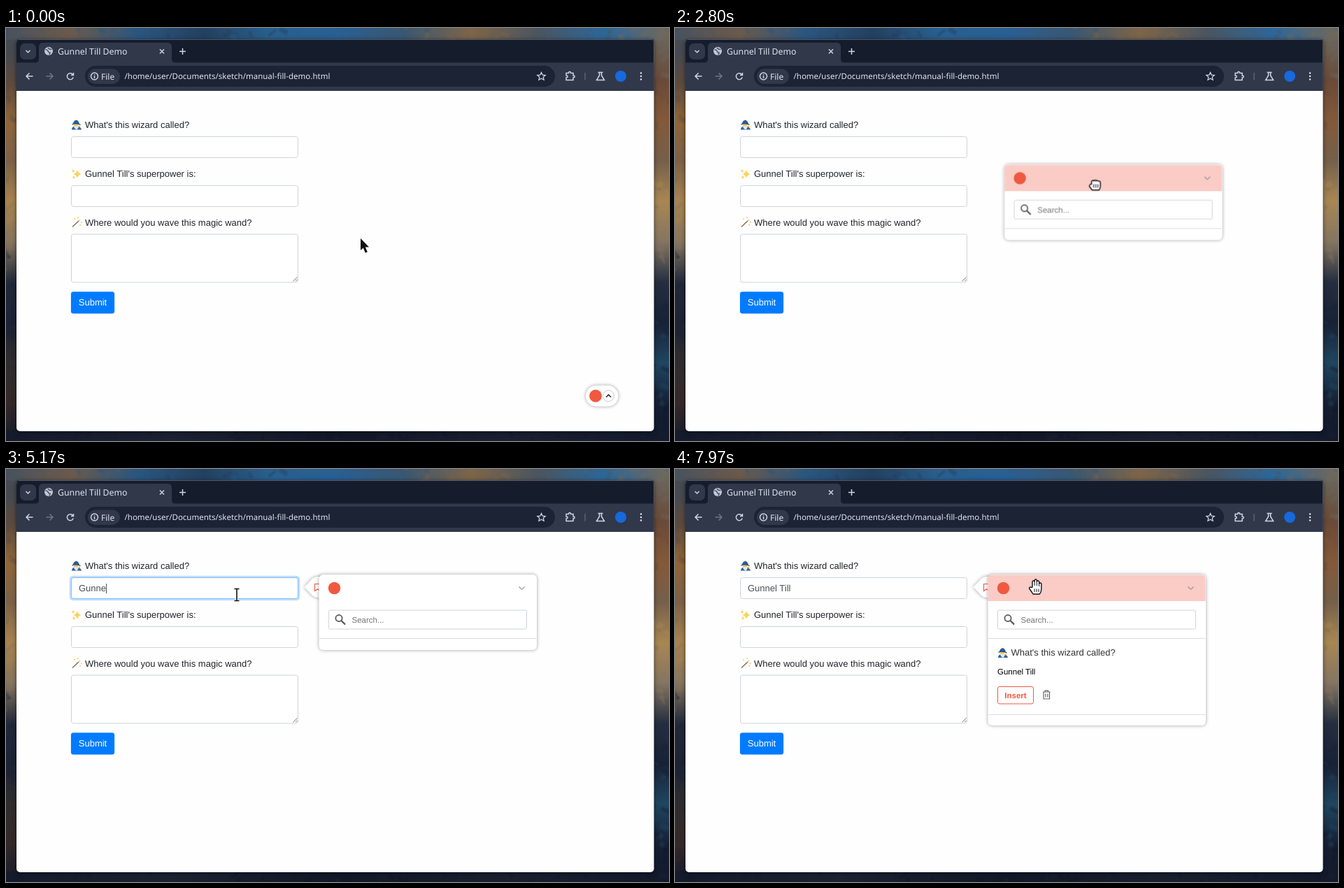
These frames come from a looping animation (948 by 591 pixels, 8 s). An HTML page:

```html
<!DOCTYPE html>
<html lang="en">
<head>
<meta charset="utf-8">
<title>Form demo</title>
<style>
html, body { margin: 0; width: 100%; height: 100%; overflow: hidden; background: #10182a; }
svg { display: block; }
text { font: 13px "Liberation Sans", Arial, sans-serif; fill: #212529; white-space: pre; text-rendering: geometricPrecision; }
.ui { font-family: "Noto Sans", sans-serif; fill: #dfe4ee; }
.small { font-size: 11.5px; }
.icon { fill: none; stroke: #cdd4e2; stroke-width: 1.5; }
.field { fill: #fff; stroke: #ced4da; }
.soft { filter: drop-shadow(0 0 2.5px rgba(0, 0, 0, .38)); }
.window { filter: drop-shadow(0 1px 3px rgba(0, 0, 0, .5)); }
.rule { stroke: #dcdfe3; }
.brand { fill: #f0593f; }
#wall { filter: blur(1px); }

/* every part shares one 8 s clock */
.anim { animation: 8s linear infinite; }
.step { animation: 8s step-end infinite; }
#cursor { animation-name: move; }
#shapes { animation-name: shape; }
#panel { animation-name: drag; }
#launcher { animation-name: leave; }
#panelView { animation-name: enter; }
#hover { animation-name: hover; }
#card { animation-name: grow; }
#item { animation-name: item; }
#ring { animation-name: focus; }
#bubble { animation-name: bubble; }
#mark { animation-name: mark; }

@keyframes move {
  0%, .4% { transform: translate(507px, 301px); animation-timing-function: ease-in-out; }
  10%, 11.25% { transform: translate(875px, 535px); animation-timing-function: ease-in-out; }
  14.1%, 21.25% { transform: translate(867px, 529px); animation-timing-function: ease-in; }
  24.1% { transform: translate(668px, 331px); animation-timing-function: ease-out; }
  31.25%, 31.6% { transform: translate(632px, 280px); animation-timing-function: ease-in-out; }
  37.9%, 40.5% { transform: translate(577px, 181px); }
  41%, 41.5% { transform: translate(577px, 179px); animation-timing-function: ease-in-out; }
  49.6%, 84.1% { transform: translate(330px, 180px); animation-timing-function: ease-in-out; }
  90%, 94.6% { transform: translate(437px, 175px); animation-timing-function: ease-in-out; }
  99.6%, 100% { transform: translate(516px, 168px); }
}
@keyframes drag {
  0%, 31.6% { transform: translate(502px, 252px); animation-timing-function: ease-in-out; }
  37.9%, 40.5% { transform: translate(447px, 153px); }
  41%, 100% { transform: translate(447px, 151px); }
}
/* cells: arrow 0, pointer 1, open hand 2, closed hand 3, text beam 4 */
@keyframes shape {
  0%, 17.5%, 45.6%, 88.3% { transform: translate(0, 0); }
  9.5%, 88.9% { transform: translate(-60px, 0); }
  27%, 41.2%, 95.8% { transform: translate(-120px, 0); }
  31.6% { transform: translate(-180px, 0); }
  46.5% { transform: translate(-240px, 0); }
}
@keyframes leave { 0% { opacity: 1; } 17.5% { opacity: 0; } }
@keyframes enter { 0% { opacity: 0; } 17.5% { opacity: 1; } }
@keyframes hover { 0%, 45.6% { opacity: 0; } 27%, 95.8% { opacity: 1; } }
@keyframes grow { 0% { height: 108px; } 93.75% { height: 216px; } }
@keyframes item { 0% { opacity: 0; } 93.75% { opacity: 1; } }
@keyframes focus { 0%, 50.4% { opacity: 0; } 52.3%, 93.4% { opacity: 1; } 94.2%, 100% { opacity: 0; } }
@keyframes bubble { 0%, 52.5% { opacity: 0; } 55%, 100% { opacity: 1; } }
@keyframes mark { 0%, 95.8% { fill: #fff; } 88.9% { fill: #f0593f; } }
</style>
</head>
<body>
<svg width="948" height="591" viewBox="0 0 948 591">
  <defs>
    <clipPath id="cell"><rect x="-25" y="-25" width="50" height="50"/></clipPath>
    <symbol id="wizard" viewBox="0 0 16 16" width="16" height="16">
      <path d="M1 15q0-5 6-5t8 5z" fill="#2b62a8"/>
      <circle cx="7" cy="8" r="3.200" fill="#f3c14b"/>
      <path d="M4 9q3 1 6.500 0q.500 4.500-2.500 6q-4-1.500-4-6z" fill="#e4e7ea"/>
      <path d="M3 6.500Q3 2 8 1q3.500 2 4 6q-4-1.500-9-.5z" fill="#2a5da0"/>
      <path d="M1.500 7.500q5-3 12 .5" fill="none" stroke="#1d3f75" stroke-width="1.300"/>
      <path d="M12 11l2.500 3.500" stroke="#805a3c"/><circle cx="12" cy="10.500" r="1.200" fill="#f2b632"/>
    </symbol>
  </defs>

  <g id="wall"></g>

  <!-- browser frame -->
  <rect class="window" x="15" y="16.500" width="911.500" height="560.500" rx="5" fill="#fffeff"/>
  <path d="M15 90V21.500q0-5 5-5H921.500q5 0 5 5V90z" fill="#151d2d"/>
  <path d="M15 90V49.500H42q5 0 5-5V27q0-6 6-6H231q6 0 6 6V44.500q0 5 5 5H926.500V90z" fill="#30384a"/>
  <rect x="20" y="22" width="23" height="23" rx="7" fill="#30384a"/>
  <rect x="113" y="54" width="672" height="30" rx="15" fill="#1b2334"/>
  <rect x="117" y="58.500" width="46" height="21.500" rx="10.700" fill="#30384a"/>
  <circle cx="61" cy="33" r="6" fill="#c2c9d6"/>
  <path d="M56.500 31q3 0 3.500 2t2.500 2-1 3M60 28q1 3 5.500 2.500" fill="none" stroke="#4a5364" stroke-width="1.500"/>
  <g class="icon">
    <path d="M28.500 32l3 3 3-3M220 30.500l6 6m0-6l-6 6M248 33.500h9m-4.500-4.500v9"/>
    <path d="M38.500 69h-9.500m4.500-4.500L29 69l4.500 4.500"/>
    <path d="M57.500 69h9.500m-4.500-4.500L67 69l-4.500 4.500" stroke="#6c7688"/>
    <path d="M95.500 66.500a4.500 4.500 0 1 0 .7 4M96.500 64v3.500H93"/>
    <circle cx="126.500" cy="69" r="5"/><path d="M126.500 68v4m0-6v1"/>
    <path d="M765.500 63.500l1.700 3.700 4 .4-3 2.700.9 4-3.600-2.100-3.600 2.100.9-4-3-2.700 4-.4z" stroke-width="1.300"/>
    <path d="M801 64.500h3.500q0-2 1.500-2t1.500 2h3.500v3.500q2 0 2 1.500t-2 1.500v3.500h-10v-3.500q2 0 2-1.500t-2-1.500z"/>
    <path d="M828 64v10.500" stroke="#596375"/>
    <path d="M846.500 63.500h7M848.500 64v4l-4 6.500h11l-4-6.500v-4"/>
  </g>
  <circle cx="879" cy="69" r="8" fill="#1769dc"/>
  <path d="M908 64.500h.01M908 69h.01M908 73.500h.01" stroke="#dfe4ee" stroke-width="2.600" stroke-linecap="round"/>
  <text class="ui" x="74" y="37.500" style="font-size:12.300px">Gunnel Till Demo</text>
  <text class="ui" x="136" y="73.500" style="font-size:12px;font-weight:500">File</text>
  <text class="ui small" x="169.500" y="73">/home/user/Documents/sketch/manual-fill-demo.html</text>

  <!-- form -->
  <use href="#wizard" x="93" y="130.500"/>
  <text x="113" y="143">What's this wizard called?</text>
  <path d="M102 203q1 5 6 6-5 1-6 6-1-5-6-6 5-1 6-6zM96 202q.500 2 2.500 2.500-2 .500-2.500 2.500-.500-2-2.500-2.500 2-.500 2.500-2.500zM97 211q.500 2 2.500 2.500-2 .500-2.500 2.500-.500-2-2.500-2.500 2-.500 2.500-2.500z" fill="#f9d35c"/>
  <text x="113" y="213">Gunnel Till's superpower is:</text>
  <path d="M95 284.500l9-8.500" stroke="#8b6a55" stroke-width="1.500"/>
  <path d="M104 276l2-2" stroke="#d8d8d8" stroke-width="2"/>
  <path d="M97 273h2m-1-1v2M102 271h2m-1-1v2M107 278h2m-1-1v2M105 282h2m-1-1v2" stroke="#f7cd5c"/>
  <text x="113" y="283">Where would you wave this magic wand?</text>
  <rect class="field" x="93.500" y="155.500" width="324" height="30" rx="3"/>
  <rect class="field" x="93.500" y="225.500" width="324" height="30" rx="3"/>
  <rect class="field" x="93.500" y="295" width="324" height="69" rx="3"/>
  <path d="M410.500 362.500l6-6m-2.500 6l2.500-2.500" stroke="#777"/>
  <g id="ring" class="anim" fill="none">
    <rect x="92" y="154" width="327" height="33" rx="4" stroke="#bfdeff" stroke-width="2.600"/>
    <rect x="93.500" y="155.500" width="324" height="30" rx="3" stroke="#80bdff"/>
  </g>
  <text id="typed" x="104" y="175" style="fill:#495057"></text>
  <path id="caret" d="M.5 164v14" stroke="#495057"/>
  <rect x="93" y="377.500" width="62" height="31" rx="3.200" fill="#007bff" stroke="#007bff" stroke-opacity=".25"/>
  <text x="124" y="397" text-anchor="middle" style="fill:#fff">Submit</text>

  <!-- collapsed launcher -->
  <g id="launcher" class="step">
    <rect class="soft" x="829" y="511.500" width="46.500" height="30" rx="15" fill="#fff"/>
    <circle class="brand" cx="843" cy="526.500" r="9"/>
    <circle cx="861.500" cy="526.500" r="8" fill="#fff" stroke="#c9c9c9"/>
    <path d="M858 528.200l3.500-3.500 3.500 3.500" fill="none" stroke="#222" stroke-width="1.500"/>
  </g>

  <g id="bubble" class="anim">
    <path class="soft" d="M426.500 169l10.500-11q4-4 9-4h8v30h-8q-5 0-9-4z" fill="#fff"/>
    <path id="mark" class="step" d="M441.500 164.500h8v10l-4-2.500-4 2.500z" stroke="#f0593f" stroke-width="1.200"/>
  </g>

  <!-- floating panel -->
  <g id="panelView" class="step">
    <g id="panel" class="anim">
      <rect id="card" class="soft step" x=".5" width="311.500" height="108" rx="6" fill="#fff"/>
      <path id="hover" class="step" d="M.5 38V6.500q0-6 6-6h299q6 0 6 6V38z" fill="#fbcbc6"/>
      <circle class="brand" cx="22.500" cy="19.500" r="8.700"/>
      <path d="M286.500 17.500l4 3.800 4-3.800" fill="none" stroke="#8d9095" stroke-width="1.100"/>
      <rect class="field" x="14.500" y="51" width="283" height="27" rx="2"/>
      <circle cx="29" cy="62.500" r="4.600" fill="none" stroke="#555" stroke-width="1.700"/>
      <path d="M32.500 66l5.500 5.500" stroke="#555" stroke-width="2.200"/>
      <text class="small" x="47.500" y="68.500" style="fill:#757575">Search...</text>
      <path class="rule" d="M.5 91.500h311"/>
      <g id="item" class="step">
        <use href="#wizard" x="14" y="104"/>
        <text x="33.500" y="116" style="fill:#333">What's this wizard called?</text>
        <text class="small" x="14" y="143" style="fill:#000">Gunnel Till</text>
        <rect x="14.500" y="160.500" width="51" height="24.500" rx="2.500" fill="#fff" stroke="#f0593f"/>
        <text class="small" x="40" y="176.500" text-anchor="middle" style="font-weight:bold;fill:#f0593f">Insert</text>
        <path d="M79 168h10.500M82 168v-1.800h4.500v1.800M80 168v10h8.500v-10M82.800 170.500v5M85.800 170.500v5" fill="none" stroke="#666" stroke-width="1.200"/>
        <path class="rule" d="M.5 200.500h311"/>
      </g>
    </g>
  </g>

  <g id="cursor" class="anim">
    <g clip-path="url(#cell)">
      <g id="shapes" class="step" fill="#fff" stroke="#111" stroke-width="1.400" stroke-linejoin="round">
        <path d="M0 0V17l3.800-3.300 3 7 3-1.300-3-6.900H12z" fill="#111" stroke="#fff" stroke-width="1.600" paint-order="stroke"/>
        <g transform="translate(60 0)">
          <path d="M-2 1q2-3 4 0v7q2-1.600 3.400.2 2-1 3 .8 2.800-.600 2.800 2v3q0 3-2 5v1.500H1V19q-3-3.500-6.500-8-.500-2.500 2-2l1.500 1.500z"/>
          <path d="M2.500 12.500v4M5 12.500v4M7.500 12.500v4" stroke-width="1"/>
        </g>
        <g transform="translate(120 0)">
          <path d="M-5 1V-7q1.600-2.600 3.200 0v-2q1.600-2.600 3.200 0v2q1.600-2.600 3.200 0v3q1.600-2 3.200 0V4q0 4-2.500 7H-4q-2.500-4-5.500-8 .500-3 3-1.500z"/>
          <path d="M-1.800-7v6M1.400-7v6M4.600-4v4M-2 3.500V8M1 3.500V8M4 3.500V8" stroke-width="1"/>
        </g>
        <g transform="translate(180 0)">
          <path d="M-5 0v-4q1.600-2.600 3.200-.5 1.600-2.500 3.200 0 1.600-2 3.200.3 2.800-.800 3 2V3q0 3-2 5.500H-4q-2-2.500-4-5 0-4 3-3.500z"/>
          <path d="M-2 0V5M1 0V5M4 0V5" stroke-width="1"/>
        </g>
        <g transform="translate(240 0)" fill="none">
          <path d="M-3.500-8.500H3.500M-3.500 8.500H3.500M0-8.500V8.500" stroke="#fff" stroke-width="3.500"/>
          <path d="M-3.500-8.500H3.500M-3.500 8.500H3.500M0-8.500V8.500" stroke-width="1.600"/>
        </g>
      </g>
    </g>
  </g>
</svg>

<script>
const byId = id => document.getElementById(id);

// Painted wallpaper, visible only around the window
const SIDES = [
  { x: -4, y: -4, w: 956, h: 21, colors: ['#46525f', '#6b5a4c', '#2b567f', '#24405f', '#29608f', '#2a5f93', '#3b5770', '#7d6549', '#4a5560', '#2d6799', '#776855'] },
  { x: -4, y: 17, w: 20, h: 578, colors: ['#3f4a58', '#5b4a40', '#8f6639', '#7d6248', '#a8834f', '#86755e', '#222a3b', '#1b2335', '#302d2f', '#35292a', '#12192b'] },
  { x: 926, y: 17, w: 26, h: 578, colors: ['#6b6459', '#6a4a38', '#84593a', '#75604a', '#a98753', '#857561', '#252e40', '#182236', '#1f4660', '#161f33', '#10182a'] },
  { x: -4, y: 576, w: 956, h: 19, colors: ['#141b2c', '#1b2231', '#111827', '#1a2030', '#121a2c'] }
];
let seed = 7;
const random = () => (seed = seed * 16807 % 2147483647) / 2147483647;

function paint({ x, y, w, h, colors }, n) {
  const wide = w > h;
  const last = colors.length - 1;
  const stops = colors.map((c, i) => `<stop offset="${i / last}" stop-color="${c}"/>`).join('');
  let out = `<linearGradient id="side${n}" x2="${+wide}" y2="${+!wide}">${stops}</linearGradient>
    <rect x="${x}" y="${y}" width="${w}" height="${h}" fill="url(#side${n})"/>`;
  for (let i = 0; i < 60; i++) {
    const along = random();
    const near = Math.round(along * last + random() * 1.6 - .8);
    const color = colors[Math.max(0, Math.min(last, near))];
    const px = x + w * (wide ? along : random()), py = y + h * (wide ? random() : along);
    out += `<path d="M${px} ${py}l${random() * 26 - 13} ${random() * 24 - 12}" stroke="${color}" stroke-width="${3 + random() * 5}" opacity=".45"/>`;
  }
  return out;
}
byId('wall').innerHTML = SIDES.map(paint).join('');

// Typing and the blinking caret follow the clock of the cursor animation
const WORD = 'Gunnel Till';
const KEYS = [4600, 4730, 4860, 4990, 5130, 5400, 5670, 5810, 5940, 6130, 6330];
const CLICK = 4000, BLUR = 7500;
const typed = byId('typed'), caret = byId('caret');
const clock = byId('cursor').getAnimations()[0];

function draw() {
  const t = (clock.currentTime || 0) % 8000;
  const count = KEYS.filter(k => k <= t).length;
  const since = t - (count ? KEYS[count - 1] : CLICK);
  typed.textContent = WORD.slice(0, count);
  const x = 103.5 + (count && typed.getComputedTextLength());
  caret.setAttribute('transform', `translate(${Math.round(x)} 0)`);
  caret.style.opacity = t >= CLICK && t < BLUR && since % 1000 < 600 ? 1 : 0;
  requestAnimationFrame(draw);
}
draw();
</script>
</body>
</html>
```
